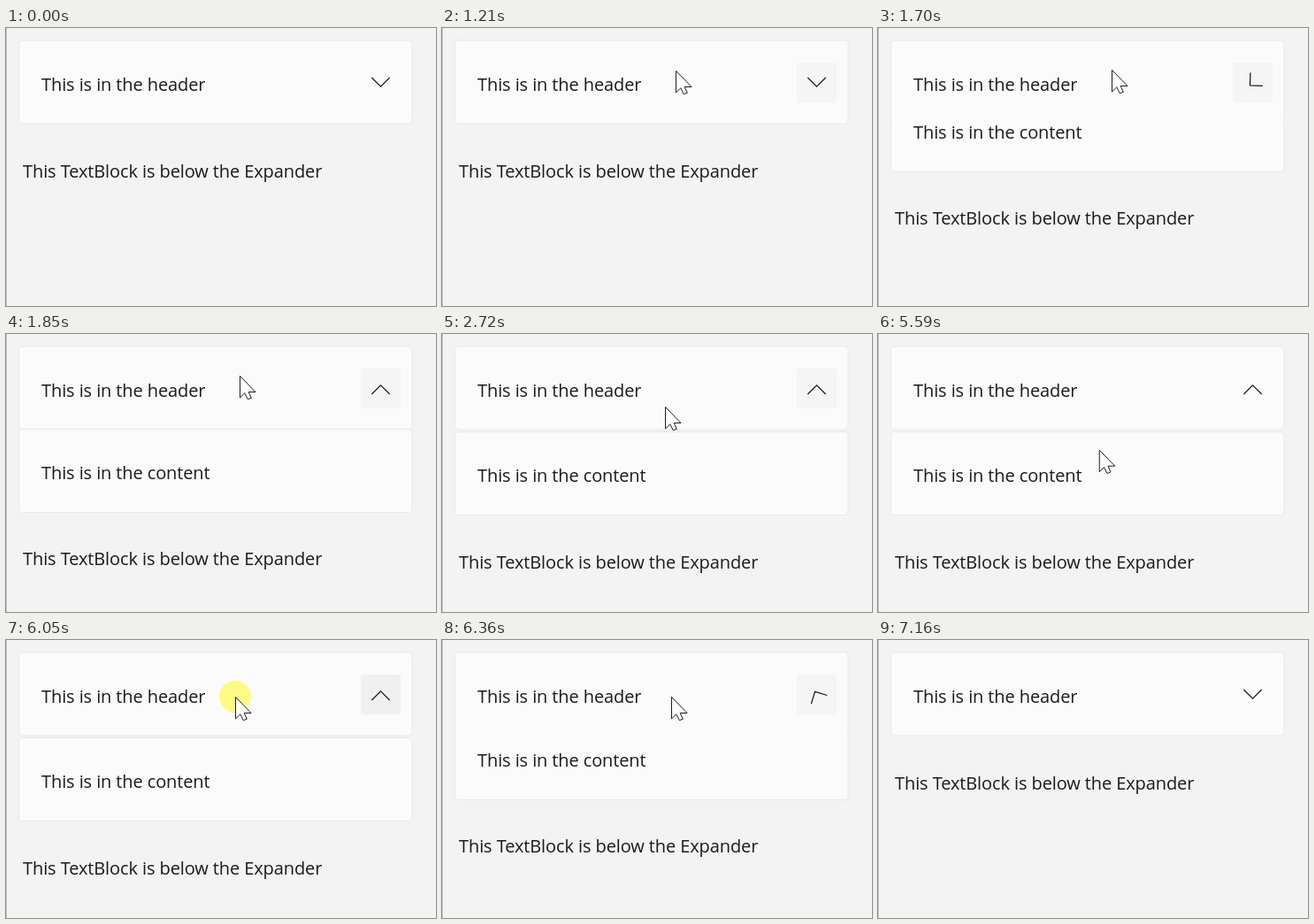
An HTML page for the animation above (7940 ms loop, 486 px wide and 314 px high).

```html
<!DOCTYPE html>
<html lang="en">
<head>
<meta charset="utf-8">
<title>Expander</title>
<style>
  html, body { margin: 0; width: 100%; height: 100%; overflow: hidden; background: #f3f3f3; }
  svg { display: block; width: 486px; height: 314px; }
  text { font: 20px "Open Sans", "Noto Sans", sans-serif; letter-spacing: -.1px; fill: #1b1b1b; }
  .card { fill: #fbfbfb; stroke: #e8e8e8; }
  #chevron { fill: none; stroke: #1b1b1b; stroke-width: 1.25; }
  #ring { fill: #fefb84; }
  #cursor { fill: #fff; stroke: #1c1c24; }
</style>
</head>
<body>
<svg viewBox="0 0 486 314">
  <clipPath id="under"><rect y="107" width="486" height="207"/></clipPath>
  <rect width="486" height="314" fill="#f3f3f3"/>
  <rect width="1" height="314" fill="#bdbdbd"/>

  <rect class="card" x="14.5" y="14" width="444.5" height="94" rx="4.5"/>
  <text x="40" y="71">This is in the header</text>
  <rect id="hover" x="401" y="39" width="45" height="45" rx="3"/>
  <path id="chevron" d="M413.3 56 423.5 66.2 433.7 56"/>

  <g clip-path="url(#under)">
    <g id="panel">
      <rect class="card" x="14.5" y="110.5" width="444.5" height="94" rx="4.5"/>
      <text x="40" y="167">This is in the content</text>
    </g>
  </g>
  <text id="below" x="19" y="169">This TextBlock is below the Expander</text>

  <circle id="ring" r="18"/>
  <path id="cursor" d="M.5 .5V25L5.8 19.8 9.3 26.8 13.3 25.2 10.2 18.5H18Z"/>
</svg>
<script>
  const LOOP = 7940, STEP = 80, PRESS = 160, TRAVEL = 96;
  const CLICKS = [1530, 6050];

  const smooth = p => p * p * (3 - 2 * p);
  const slowing = p => 1 - (1 - p) ** 2;
  const settling = p => 1 - (1 - p) ** 3.6;
  const speeding = p => p * p;

  // Pointer path: first and last step in ms, destination, easing.
  const ORIGIN = [415, 385];
  const MOVES = [
    [750, 1210, 264, 48, slowing],
    [1530, 1610, 264, 47, slowing],
    [2480, 2720, 252, 82, smooth],
    [2790, 3030, 252, 112, slowing],
    [3640, 3720, 249, 136, smooth],
    [5590, 5970, 259, 64, smooth],
    [6770, 7160, 451, 398, speeding]
  ];

  // Stepped progress: the first step shows at `first`, the final pose at `last`.
  function ramp(t, first, last, ease) {
    const gaps = Math.round((last - first) / STEP);
    const step = Math.floor((t - first) / (last - first) * gaps + .05) + 1;
    return ease(Math.min(1, Math.max(0, step / (gaps + 1))));
  }

  function pointer(t) {
    let [x, y] = ORIGIN;
    for (const [first, last, toX, toY, ease] of MOVES) {
      const p = ramp(t, first, last, ease);
      x += (toX - x) * p;
      y += (toY - y) * p;
    }
    return [x, y];
  }

  const el = id => document.getElementById(id);
  const [hover, chevron, panel, below, ring, cursor] =
    ['hover', 'chevron', 'panel', 'below', 'ring', 'cursor'].map(el);
  const put = (node, x, y) => node.setAttribute('transform', `translate(${x} ${y})`);
  const show = (node, on) => node.setAttribute('opacity', on ? 1 : 0);

  function draw(t) {
    const [x, y] = pointer(t);
    const pressed = CLICKS.some(c => t >= c && t < c + PRESS);
    const open = ramp(t, 1690, 2010, settling) * (1 - ramp(t, 6290, 6450, smooth));
    const turn = ramp(t, 1690, 1850, smooth) * (1 - ramp(t, 6290, 6530, smooth));

    put(cursor, x, y);
    put(ring, x, y);
    show(ring, pressed);

    show(hover, y < 111);
    hover.setAttribute('fill', pressed ? '#f0f0f0' : '#f5f5f5');
    chevron.setAttribute('transform', `rotate(${180 * turn} 423.5 62)`);

    show(panel, open > 0);
    put(panel, 0, Math.trunc(TRAVEL * (open - 1)));
    put(below, 0, Math.trunc(TRAVEL * open));
  }

  const start = performance.now();
  function tick() {
    draw((performance.now() - start) % LOOP);
    requestAnimationFrame(tick);
  }
  tick();
</script>
</body>
</html>
```
